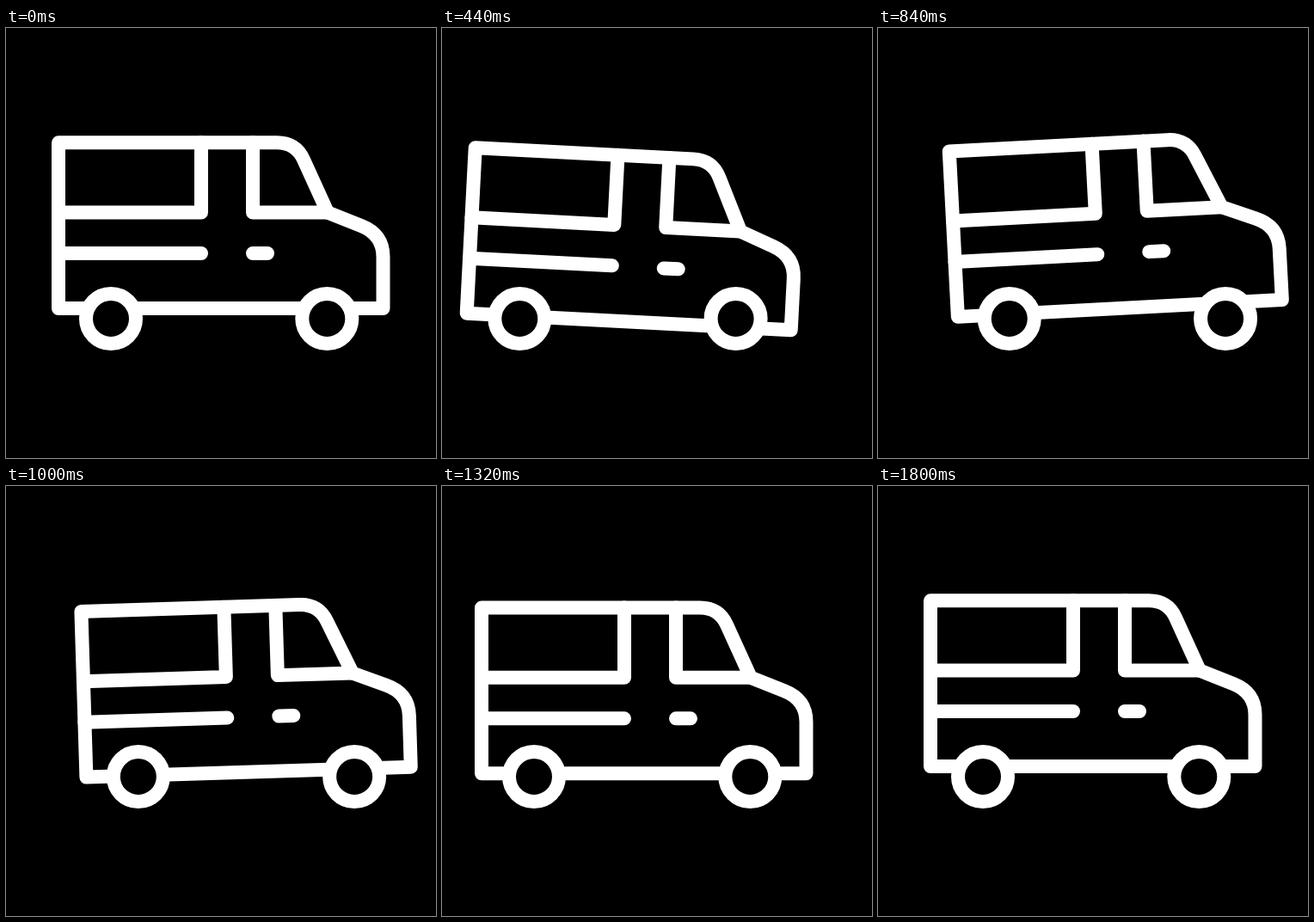
An HTML page for the animation above (2 s loop, 500 px wide and 500 px high).

```html
<!DOCTYPE html>
<html lang="en">
<head>
<meta charset="utf-8">
<title>Van</title>
<style>
  html, body { margin: 0; width: 100%; height: 100%; overflow: hidden; background: #000; }
  svg { display: block; width: 100vw; height: 100vh; }
</style>
</head>
<body>
<svg viewBox="0 0 500 500" fill="none" stroke="#fff" stroke-width="16" stroke-linecap="round" stroke-linejoin="round">
  <g id="body">
    <path d="M61 326V133.3H315Q337 133.3 346 153L374 214.5L413 230Q438.5 240 438.5 266V326Z"/>
    <path d="M61 214.5H227V133.3M287 133.3V214.5H374"/>
    <path d="M61 262H227M287 262H304"/>
  </g>
  <g id="wheels" fill="#000">
    <circle cx="122" cy="338" r="29"/>
    <circle cx="373.3" cy="338" r="29"/>
  </g>
</svg>
<script>
  const LOOP = 2000, STEP = 40;
  const DEPTH = 16.6, LEAN = 3;
  const body = document.getElementById("body");
  const wheels = document.getElementById("wheels");

  // Slow at both ends, steepest in the middle.
  const ease = p => p - 0.72 * Math.sin(2 * Math.PI * p) / (2 * Math.PI);

  function render(t) {
    const ramp = (from, to) => ease(Math.min(1, Math.max(0, (t - from) / (to - from))));

    // Back, forward, back again, then home.
    const x = -32 * ramp(0, 432) + 67.5 * ramp(432, 924) - 52.5 * ramp(924, 1370) + 17 * ramp(1370, 1800);
    // The suspension dips twice while the body leans to the front, then to the rear.
    const sink = DEPTH * (ramp(0, 360) - ramp(360, 840) + ramp(840, 1200) - ramp(1200, 1440));
    const tilt = LEAN * (ramp(0, 432) - 2 * ramp(432, 840) + ramp(840, 1200));

    wheels.setAttribute("transform", `translate(${x} 0)`);
    body.setAttribute("transform", `translate(${x} ${sink}) rotate(${tilt} 250 310)`);
  }

  const start = performance.now();
  function tick() {
    const t = (performance.now() - start) % LOOP;
    render(Math.floor(t / STEP) * STEP);
    requestAnimationFrame(tick);
  }
  tick();
</script>
</body>
</html>
```
